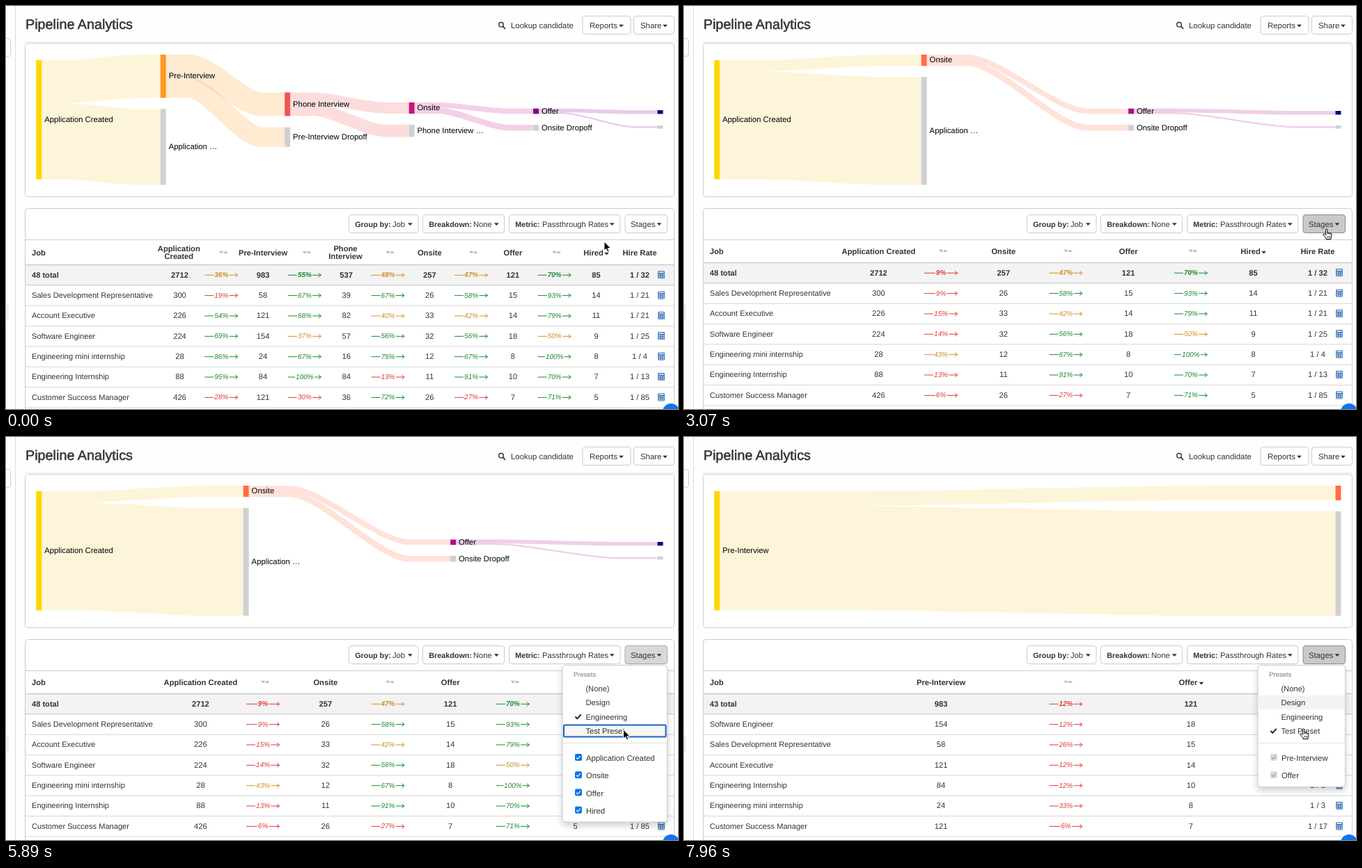
Recreate the animation shown at these times as an HTML page. Size 965 px wide and 580 px high, loop 8 s.

```html
<!DOCTYPE html>
<html lang="en">
<head>
<meta charset="utf-8">
<title>Pipeline Analytics</title>
<style>
html, body { margin: 0; width: 100%; height: 100%; overflow: hidden; background: #fefefe; }
svg { display: block; width: 965px; height: 580px; font-family: "Liberation Sans", Arial, sans-serif; }
text { white-space: pre; text-rendering: geometricPrecision; }
.menu { filter: drop-shadow(0 5px 5px rgba(0, 0, 0, .18)); }
</style>
</head>
<body>
<svg id="stage" viewBox="0 0 965 580" xmlns="http://www.w3.org/2000/svg">
  <defs>
    <g id="calc">
      <rect x="-4.8" y="-5.5" width="9.6" height="11" rx=".8" fill="#2f70b5"/>
      <path d="M-3.6 -3.6H3.6" stroke="#fff" stroke-width="1.5"/>
      <path d="M-3.6 -.6H3.6M-3.6 1.8H3.6M-3.6 4.1H3.6" stroke="#fff" stroke-width="1.3" stroke-dasharray="1.6 1.2"/>
    </g>
    <path id="arrow" d="M0 0V13.2L3 10.4L5.1 15.2L7.2 14.3L5.2 9.6H9.4Z" fill="#000" stroke="#fff" stroke-width="1"/>
    <g id="hand" stroke="#000" stroke-width="1" stroke-linejoin="round">
      <path fill="#fff" d="M-1.6 1.2Q-1.6 0 -.4 0T.8 1.2V5.2Q2 4.4 2.9 5.6Q4.2 5 4.9 6.2Q6.9 5.8 6.9 7.8V10Q6.9 11.5 6 13V14.6H-1V13L-5 8.6Q-5.6 7.2 -4.2 6.9Q-3 7 -1.6 8.8Z"/>
      <path fill="none" stroke-width=".8" d="M.8 5V7.6M2.9 5.6V7.8M4.9 6.2V8M1 10V12.6M3 10V12.6M4.8 10V12.6"/>
    </g>
  </defs>
  <g id="page"></g>
  <g id="live"></g>
  <circle cx="955" cy="584" r="12" fill="#1172f2"/>
  <g id="pointer"></g>
</svg>
<script>
const $ = id => document.getElementById(id);

const names = ['Application Created', 'Pre-Interview', 'Phone Interview', 'Onsite', 'Offer', 'Hired'];
const totals = [2712, 983, 537, 257, 121, 85];
const jobs = [
  ['Sales Development Representative', 300, 58, 39, 26, 15, 14],
  ['Account Executive', 226, 121, 82, 33, 14, 11],
  ['Software Engineer', 224, 154, 57, 32, 18, 9],
  ['Engineering mini internship', 28, 24, 16, 12, 8, 8],
  ['Engineering Internship', 88, 84, 84, 11, 10, 7],
  ['Customer Success Manager', 426, 121, 36, 26, 7, 5]
];

const views = {
  all: {
    cols: [0, 1, 2, 3, 4, 5], count: 48, head: 372.5,
    main: [78, 70, 124.4, 138.7, 147.6, 150], drop: [148, 174.6, 170.7, 171, 172],
    drops: ['Application …', 'Pre-Interview Dropoff', 'Phone Interview …', 'Onsite Dropoff'],
    colors: ['#ffd700', '#ff9721', '#f05655', '#c71580', '#800090', '#00008b']
  },
  short: {
    cols: [0, 3, 4, 5], count: 48, head: 369.5,
    main: [78, 70, 147.6, 151], drop: [102, 171, 172],
    drops: ['Application …', 'Onsite Dropoff'],
    colors: ['#ffd700', '#ff6f43', '#aa0f88', '#00008b']
  },
  pair: {
    cols: [1, 4], count: 43, head: 369.5,
    main: [78, 70], drop: [107], drops: [],
    colors: ['#ffd700', '#ff6f43']
  }
};

const TICK = 147.8, LEAD = 34, LOOP = 8000;
const loads = [[13.8, 18], [27.97, 32], [40.3, 45]];
const menus = [
  { from: 4, to: 14, check: 0, pick: 1, at: 12 },
  { from: 22, to: 28, check: 1, pick: 2, at: 27 },
  { from: 36, to: 41, check: 2, pick: 3, at: 40 },
  { from: 48, to: 99, check: 3, hover: 1 }
];
const presses = [21, 35, 47];
// tick, x, y, hand
const moves = [
  [0, 859, 339], [3, 900, 326, 1], [5, 905, 322, 1], [6, 905, 322, 1], [9, 846, 385],
  [10, 852, 382], [11, 852, 382], [12, 868, 380], [13, 872, 380], [14, 874, 374],
  [18, 918, 328], [20, 923, 321, 1], [22, 923, 321, 1], [24, 872, 400], [26, 872, 400],
  [27, 873, 401], [28, 876, 396], [31, 908, 328], [32, 911, 324], [33, 911, 324],
  [34, 918, 322, 1], [36, 920, 321, 1], [39, 888, 418], [40, 886.5, 421], [41, 895, 410],
  [43, 929, 343, 1], [46, 926, 320, 1], [49, 930, 316, 1], [52, 864, 392, 1], [54, 890, 420, 1]
];

const text = (x, y, s, o = {}) =>
  `<text x="${x}" y="${y}" font-size="${o.size || 11.2}" fill="${o.fill || '#333'}"` +
  (o.mid ? ' text-anchor="middle"' : '') + (o.bold ? ' font-weight="700"' : '') +
  (o.ital ? ' font-style="italic"' : '') + (o.extra || '') + `>${s}</text>`;
const rect = (x, y, w, h, fill, extra = '') =>
  `<rect x="${x}" y="${y}" width="${w}" height="${h}" fill="${fill}" ${extra}/>`;
const line = (d, color, width = 1) =>
  `<path d="${d}" fill="none" stroke="${color}" stroke-width="${width}"/>`;
const caret = (x, y, fill = '#333', up = 1) =>
  `<path d="M${x - 3.4} ${y - 1.8 * up}h6.8l-3.4 ${3.8 * up}z" fill="${fill}"/>`;
const button = (x, y, w, fill = '#fff', edge = '#ccc') =>
  rect(x, y, w, 26, fill, `rx="3.5" stroke="${edge}"`);
const tick = (x, y, color, width, s = 1) =>
  line(`M${x - 4 * s} ${y}l${2.8 * s} ${2.9 * s}l${5.4 * s} ${-6 * s}`, color, width);

function drawPage() {
  const pick = (x, w, label, value, vx, cx) => button(x, 300.5, w) +
    text(x + 8.7, 318, label, { bold: 1, size: 10.8 }) + text(vx, 318, value) + caret(cx, 314);
  return line('M13.5 0V580', '#ddd') +
    rect(-8, 46.5, 14.5, 26, '#fff', 'rx="3.5" stroke="#ccc"') +
    rect(-4, 429.5, 8, 23, '#eaf2fb', 'rx="3"') +
    text(28, 33, 'Pipeline Analytics', { size: 19.8, extra: ' stroke="#333" stroke-width=".5"' }) +
    '<circle cx="711" cy="26.8" r="3.3" fill="none" stroke="#333" stroke-width="1.4"/>' +
    line('M713.4 29.2L717 33', '#333', 1.8) +
    text(725, 32, 'Lookup candidate', { size: 11.4 }) +
    button(828, 14.5, 69) + text(838, 32, 'Reports', { size: 11.4 }) + caret(883.5, 28.5) +
    button(901.5, 14.5, 58) + text(911, 32, 'Share', { size: 11.4 }) + caret(946.5, 28.5) +
    line('M27 51.5H960', '#ebebeb') +
    rect(27.5, 53.5, 932, 221, '#fff', 'rx="4" stroke="#ccc"') +
    rect(27.5, 291.5, 932, 286.5, '#fff', 'rx="4" stroke="#ccc"') +
    line('M28 336.5H959', '#ccc') +
    pick(492.5, 99.5, 'Group by:', 'Job', 555, 580.3) +
    pick(598.5, 117, 'Breakdown:', 'None', 671, 704.3) +
    pick(722.5, 159.5, 'Metric:', 'Passthrough Rates', 770, 870.3);
}

function drawFlow(v) {
  const n = v.cols.length, val = v.cols.map(c => totals[c]), scale = 171.5 / val[0];
  const colX = i => 43.3 + 892.2 * i / (n - 1);
  // Flat ends with a soft diagonal between them
  const link = (i, y0, y1, h) => {
    const a = colX(i) + 8, b = colX(i + 1), w = b - a, color = i ? v.colors[i] : '#f5cd46';
    return `<path d="M${a} ${y0}H${a + w * .2}C${a + w * .36} ${y0} ${b - w * .36} ${y1} ${b - w * .2} ${y1}H${b}" fill="none" stroke="${color}" stroke-width="${h}" opacity=".2"/>`;
  };
  const node = (i, y, h, color, label) => rect(colX(i), y, 8, h, color) +
    (label && i < n - 1 ? text(colX(i) + 11.9, y + h / 2 + 3.2, label, { size: 11.3, fill: '#000' }) : '');
  let links = '', nodes = '';
  for (let i = 0; i < n; i++) {
    const h = val[i] * scale;
    nodes += node(i, v.main[i], h, v.colors[i], names[v.cols[i]]);
    if (i === n - 1) break;
    const on = val[i + 1] * scale, off = h - on, box = Math.max(off, 4.5);
    links += link(i, v.main[i] + on / 2, v.main[i + 1] + on / 2, on) +
      link(i, v.main[i] + on + off / 2, v.drop[i] + box / 2, off);
    nodes += node(i + 1, v.drop[i], box, '#d0d0d2', v.drops[i]);
  }
  return links + nodes;
}

function drawRate(x, y, from, to, bold) {
  const p = Math.round(100 * to / from), s = p + '%';
  const color = p < 35 ? '#dd3a37' : p <= 50 ? '#d38b1e' : '#16892b';
  const w = (s.length - 1) * 2.8 + 5.4;
  return text(x, y + 3.5, s, { mid: 1, ital: 1, bold, size: 10, fill: color }) +
    line(`M${x - 24} ${y + .5}H${x - w}M${x + w + .3} ${y + .5}H${x + 23.5}m-3.6 -2.8l3.6 2.8l-3.6 2.8`, color);
}

function drawTable(v) {
  const n = v.cols.length, step = 717.6 / n, top = v.head, last = n - 1;
  const colX = i => 189.7 + step * (i + .5), hy = n === 6 ? 358.5 : 356.5;
  const bold = { bold: 1 }, head = { bold: 1, mid: 1 };
  let out = rect(28, 337, 931, 243, '#fff') + line('M27.5 336V580M959.5 336V580', '#ccc') +
    line('M28 336.5H959', '#ccc') + rect(28, top, 931, 29.3, '#f3f3f3') +
    text(37, hy, 'Job', bold) + text(910, hy, 'Hire Rate', head);

  v.cols.forEach((c, i) => {
    const x = colX(i), words = names[c].split(' ');
    if (n === 6 && words[1]) {
      out += text(x - 1.2, 353, words[0], head) + text(x - 1.2, 364, words[1], head);
    } else {
      out += text(i === last ? x - 4 : x, hy, names[c], head);
    }
    if (i === last) out += caret(x + 15, hy - 2);
    else out += caret(x + step / 2, hy - 4, '#bbb') + caret(x + step / 2 + 6, hy - 4.3, '#bbb', -1);
  });

  const end = v.cols[last];
  const rows = [[v.count + ' total', ...totals], ...[...jobs].sort((a, b) => b[end + 1] - a[end + 1])];
  rows.forEach((r, j) => {
    const y = top + 14.3 + 29.35 * j, val = v.cols.map(c => r[c + 1]), b = j === 0;
    out += text(37, y + 3.8, r[0], { bold: b, size: 11.1 });
    val.forEach((q, i) => {
      out += text(colX(i), y + 3.8, q, { mid: 1, bold: b });
      if (i < last) out += drawRate(colX(i) + step / 2, y, q, val[i + 1], b);
    });
    out += text(910, y + 3.8, '1 / ' + Math.round(val[0] / val[last]), { mid: 1, bold: b }) +
      `<use href="#calc" x="941" y="${y}"/>` +
      line(`M28 ${top + 29.35 * (j + 1)}H959`, b ? '#c4c4c4' : '#d4d4d4');
  });
  return out + line(`M28 ${top}H959`, '#ccc', 1.6);
}

function drawMenu(m, k, v) {
  const n = v.cols.length, off = n === 2, x = off ? 824 : 799, w = 949.5 - x;
  const itemY = i => 361.5 + 20.5 * i;
  let out = rect(x, 328.5, w, 124.5 + 25.25 * n, '#fff', 'rx="4" stroke="#ccc" class="menu"') +
    text(x + 16, 345, 'Presets', { size: 9.5, fill: '#777' });
  if (m.hover) out += rect(x + .5, itemY(m.hover) - 10.2, w - 1, 20.5, '#f3f3f3');
  if (k >= m.at) {
    out += rect(x + 2, itemY(m.pick) - 8.5, w - 4, 17, '#f5f5f5', 'rx="1.5" stroke="#1b5fc4" stroke-width="2"');
  }
  ['(None)', 'Design', 'Engineering', 'Test Preset'].forEach((s, i) => {
    out += text(x + 33.4, itemY(i) + 4.2, s);
    if (i === m.check) out += tick(x + 22.5, itemY(i), '#222', 2);
  });
  out += line(`M${x + .5} 440.5H949`, '#e2e2e2');
  v.cols.forEach((c, i) => {
    const y = 461 + 25.25 * i;
    out += rect(x + 18, y - 5, 10, 10, off ? '#d9d9d9' : '#0b74e8', 'rx="2"') +
      tick(x + 22.8, y + .3, off ? '#999' : '#fff', 1.2, .7) +
      text(x + 34, y + 5, names[c], { size: 11.3 });
  });
  return out;
}

function drawDots(ms) {
  const ease = u => u * u * (3 - 2 * u);
  return [0, 1, 2].map(i => {
    const u = ((ms + 320 - 160 * i) % 1400) / 560;
    const s = u < 1 ? ease(u) : u < 2 ? 1 - ease(u - 1) : 0;
    return `<circle cx="${452.7 + 41.2 * i}" cy="455.5" r="${20 * s}" fill="#cacaca"/>`;
  }).join('');
}

function drawPointer(k) {
  let i = moves.length - 1;
  while (moves[i][0] > k) i--;
  const a = moves[i], b = moves[i + 1] || a, f = (k - a[0]) / (b[0] - a[0] || 1);
  const x = a[1] + (b[1] - a[1]) * f, y = a[2] + (b[2] - a[2]) * f;
  return `<use href="#${a[3] ? 'hand' : 'arrow'}" x="${x}" y="${y}"/>`;
}

function draw(k) {
  const v = k < 18 ? views.all : k < 45 ? views.short : views.pair;
  const load = loads.find(l => k >= l[0] && k < l[1]);
  const menu = menus.find(m => k >= m.from && k < m.to);
  const dark = presses.includes(k) || (menu && menu.hover);
  const [fill, edge] = dark ? ['#c9c9c9', '#8c8c8c'] : menu ? ['#d8d8d8', '#a8a8a8'] : ['#fff', '#ccc'];
  let out = `<g opacity="${load ? .22 : 1}">${drawFlow(v)}</g>` +
    button(889, 300.5, 60.5, fill, edge) + text(897, 318, 'Stages', { size: 11.4 }) + caret(938, 314);
  out += load
    ? text(493, 167, 'Loading...', { size: 12.7, mid: 1, fill: '#000' }) + drawDots((k - load[0]) * TICK)
    : drawTable(v);
  if (menu) out += drawMenu(menu, k, v);
  $('live').innerHTML = out;
  $('pointer').innerHTML = drawPointer(k);
}

$('page').innerHTML = drawPage();
const start = performance.now();
let shown = -1;
function frame() {
  const k = Math.floor(((performance.now() - start) % LOOP + LEAD) / TICK);
  if (k !== shown) draw(shown = k);
  requestAnimationFrame(frame);
}
frame();
</script>
</body>
</html>
```
